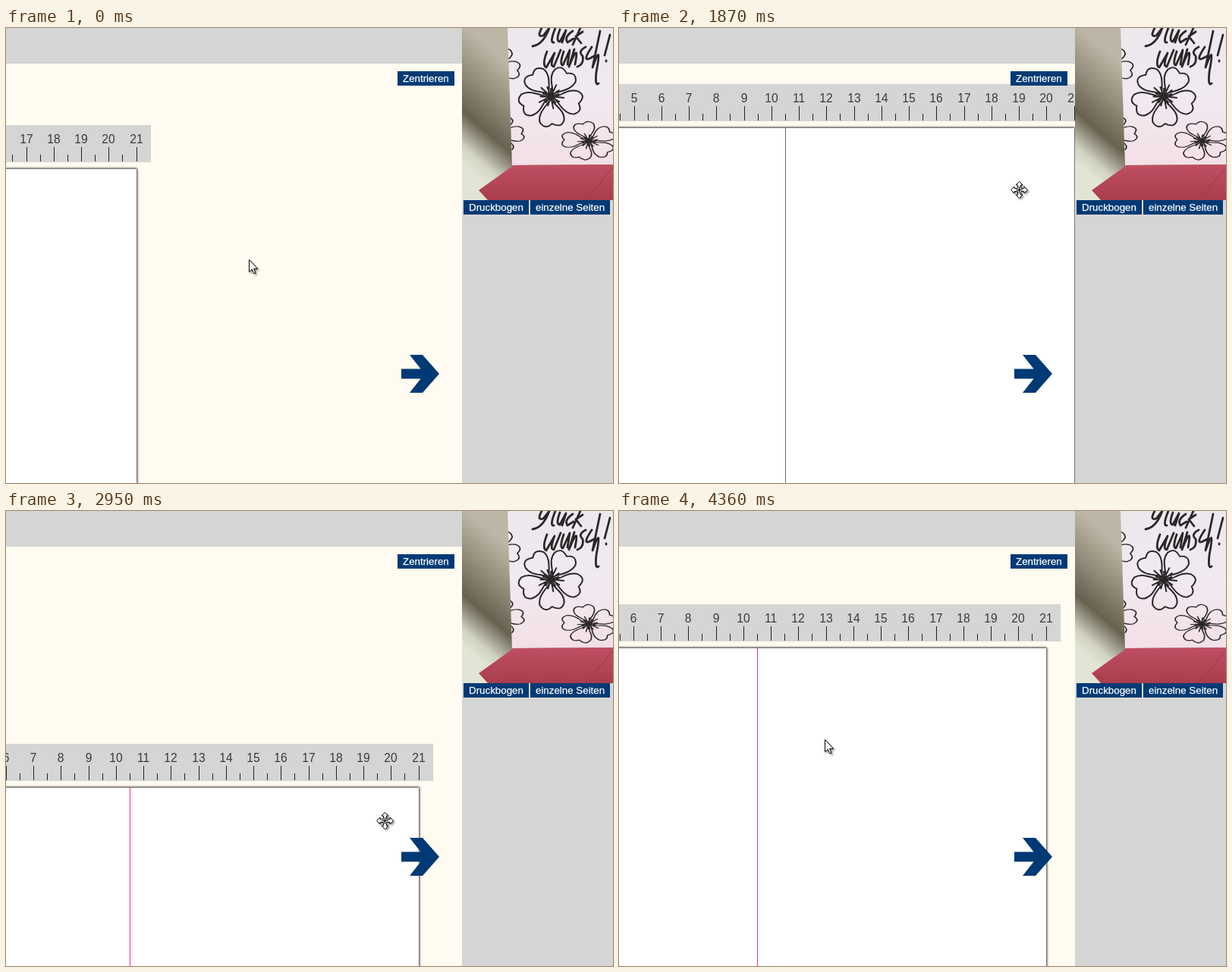
Animation, 800 px wide and 600 px high, one loop 4520 ms. Source, as an HTML page:

```html
<!DOCTYPE html>
<html lang="de">
<head>
<meta charset="utf-8">
<style>
html, body { margin: 0; width: 100%; height: 100%; overflow: hidden; }
svg { display: block; width: 800px; height: 600px; font-family: "Liberation Sans", Arial, sans-serif; }
.ink { fill: none; stroke: #2b2629; stroke-width: 2; stroke-linecap: round; stroke-linejoin: round; }
.letters { stroke-width: 2.8; }
.ruler text { font-size: 15.6px; fill: #3a3a3a; text-anchor: middle; }
.crisp { shape-rendering: crispEdges; }
.button rect { fill: #003a75; }
.button text { font-size: 13.333px; fill: #fff; stroke: #fff; stroke-width: .25; }
.cursor { fill: #fff; stroke: #000; filter: url(#cursorShadow); }
</style>
</head>
<body>
<svg viewBox="0 0 800 600">
  <defs>
    <clipPath id="workspace"><rect y="47" width="601" height="553"/></clipPath>
    <clipPath id="photo"><rect x="601" width="199" height="227"/></clipPath>
    <clipPath id="cardFront"><path d="M661 0H800V180L667 181Z"/></clipPath>
    <filter id="soft" filterUnits="userSpaceOnUse" x="-900" y="-20" width="930" height="940"><feGaussianBlur stdDeviation="1.5"/></filter>
    <filter id="cursorShadow" x="-50%" y="-50%" width="200%" height="200%"><feDropShadow dx="2" dy="2" stdDeviation="1" flood-opacity=".4"/></filter>
    <linearGradient id="inside" gradientUnits="userSpaceOnUse" x1="720" y1="52" x2="607" y2="183">
      <stop offset=".2" stop-color="#bdb6a6"/><stop offset=".45" stop-color="#958d7b"/>
      <stop offset=".7" stop-color="#686150"/><stop offset=".9" stop-color="#d2d3c1"/><stop offset="1" stop-color="#e2e5d5"/>
    </linearGradient>
    <linearGradient id="front" x2="0" y2="1"><stop stop-color="#ece8ec"/><stop offset=".5" stop-color="#f1eaf0"/><stop offset="1" stop-color="#f4dfe7"/></linearGradient>
    <linearGradient id="envelope" x2="0" y2="1"><stop stop-color="#c04f62"/><stop offset="1" stop-color="#a83d4d"/></linearGradient>
  </defs>

  <rect width="800" height="600" fill="#d5d5d5"/>
  <rect y="47" width="601" height="553" fill="#fffbf0"/>
  <g clip-path="url(#workspace)">
    <g id="sheet">
      <rect x="-762" width="763" height="900" fill="#000" filter="url(#soft)" opacity=".85"/>
      <rect x="-762" y="1" width="762" height="900" fill="#fff"/>
      <rect id="fold" class="crisp" x="-381" y="1" width="1" height="900"/>
      <g id="ruler" class="ruler"><rect class="crisp" x="-781" y="-57" width="800" height="49" fill="#d5d5d5"/></g>
    </g>
  </g>
  <path fill="#003a75" d="M521 449.5H546.5L532 431H549L571 456L549 481H532L546.5 462.5H521Z"/>

  <g clip-path="url(#photo)">
    <rect x="601" width="199" height="227" fill="url(#inside)"/>
    <path d="M661 0H800V180L667 181Z" fill="url(#front)"/>
    <path d="M623 214L669 181L800 180V227H635Z" fill="url(#envelope)"/>
    <path d="M764 227L800 184" stroke="#98394a" fill="none"/>
    <g class="ink" clip-path="url(#cardFront)">
      <g id="flowers"></g>
      <path class="letters" d="M706 0Q699 13 708 10L716 0Q708 22 694 24M724 0Q716 20 722 19M730 2Q724 18 730 18L738 3L733 19M747 4Q735 12 740 19L748 14M757 0L747 22M760 5L751 11L758 20"/>
      <path class="letters" d="M713 31Q706 49 712 52L723 33Q716 51 722 51L731 29M735 31Q729 49 734 49L743 29L740 48M749 28L742 51Q756 16 750 48M764 25Q753 31 760 37Q762 48 753 51M772 25Q756 49 775 37M783 4L773 52Q786 16 778 58Q776 78 781 73M796 9L789 36M791 43V44"/>
    </g>
  </g>
  <g id="buttons"></g>

  <path id="arrow" class="cursor" d="M.5 .5V16.7L4.2 13.2L6.8 19L9 18L6.6 12.4H11.6Z"/>
  <g id="move" class="cursor"></g>
</svg>
<script>
const LOOP = 4520, STEP = 30, CM = 36.25;
const PRESS = 910, RELEASE = 3580, LEAVE = 3740, GLIDE = 4060;
const LAG = 80, GRIP = [76, -81];
const $ = id => document.getElementById(id);

function add(parent, tag, attrs, text) {
  const node = document.createElementNS("http://www.w3.org/2000/svg", tag);
  for (const key in attrs) node.setAttribute(key, attrs[key]);
  if (text !== undefined) node.textContent = text;
  return parent.appendChild(node);
}

// Ruler: origin is the right edge of the sheet, at 21 cm
for (let half = 0; half <= 42; half++) {
  const x = Math.floor((half / 2 - 21) * CM), whole = half % 2 === 0;
  add($("ruler"), "rect", { class: "crisp", x, y: whole ? -28 : -18, width: 1, height: whole ? 19 : 9, fill: "#222" });
  if (whole) add($("ruler"), "text", { x, y: -33 }, half / 2);
}

function button(x, y, width, label) {
  const group = add($("buttons"), "g", { class: "button" });
  add(group, "rect", { x, y, width, height: 19 });
  add(group, "text", { x: x + 7, y: y + 14 }, label);
}
button(516, 57, 75, "Zentrieren");
button(603, 227, 86, "Druckbogen");
button(691, 227, 105, "einzelne Seiten");

function flower(x, y, sx, sy, turn) {
  const group = add($("flowers"), "g", { transform: `translate(${x} ${y}) scale(${sx} ${sy})` });
  for (let i = 0; i < 5; i++) {
    add(group, "path", {
      transform: `rotate(${turn + i * 72})`,
      d: "M4 0C14 -6 20 -18 33 -17Q45 -14 38 -1Q47 8 36 15C24 18 14 7 4 0M0 0L17 -3M0 0L13 4M0 0L9 -6"
    });
  }
}
flower(718, 90, 1, .95, -55);
flower(768, 149, .85, .6, -30);
flower(645, 140, .9, .6, 0);
flower(640, 52, .9, .7, 10);

for (let side = 0; side < 4; side++) {
  add($("move"), "path", { transform: `rotate(${side * 90})`, d: "M-2 -2V-6.5H-4.5L0 -11L4.5 -6.5H2V-2M0 0V-4.5" });
}

// The hand: rows of [time, x, y]
const hand = [
  [130, 320, 305], [580, 96, 266], [PRESS, 96, 266],
  [1340, 285, 230], [1610, 469, 199], [1790, 524, 212], [1870, 527, 213],
  [2200, 498, 133], [2410, 458, 231], [2630, 431, 385], [2710, 431, 442], [2800, 447, 458],
  [3110, 537, 333], [3190, 531, 318], [3500, 487, 261], [RELEASE, 474, 283],
  [LEAVE, 452, 280], [3900, 433, 283], [4360, 271, 301]
];

// Cubic interpolation that never overshoots its points
function along(path, time) {
  const last = path.length - 1;
  const t = Math.min(Math.max(time, path[0][0]), path[last][0]);
  let i = 0;
  while (i < last - 1 && t > path[i + 1][0]) i++;
  const span = path[i + 1][0] - path[i][0], u = (t - path[i][0]) / span, v = 1 - u;
  return [1, 2].map(axis => {
    const slope = k => (path[k + 1][axis] - path[k][axis]) / (path[k + 1][0] - path[k][0]);
    const tangent = k => {
      if (k === 0 || k === last) return 0;
      const a = slope(k - 1), b = slope(k);
      return a * b > 0 ? 2 * a * b / (a + b) : 0;
    };
    return Math.round(path[i][axis] * v * v * (1 + 2 * u) + path[i + 1][axis] * u * u * (3 - 2 * u)
      + span * u * v * (tangent(i) * v - tangent(i + 1) * u));
  });
}

function recorded(t) {
  const snap = (start, step) => start + Math.floor((t - start) / step) * step;
  if (t < LEAVE) return Math.min(snap(160, STEP), RELEASE);
  return t < GLIDE ? snap(LEAVE, 160) : snap(GLIDE, STEP);
}

function place(node, [x, y]) {
  node.setAttribute("transform", `translate(${x} ${y})`);
}

function draw(now) {
  const t = recorded(now % LOOP);
  const tip = along(hand, t);
  // The sheet trails the hand and stays where it was at the release
  const dragTime = Math.max(PRESS, Math.min(t, RELEASE) - LAG);
  const sheet = along(hand, dragTime).map((value, axis) => value + GRIP[axis]);
  const moving = t < LEAVE && tip[0] < sheet[0];
  place($("sheet"), sheet);
  $("fold").setAttribute("fill", t < 1990 ? "#776d6d" : "#f5269f");
  place($("arrow"), tip);
  place($("move"), [tip[0] + .5, tip[1] + .5]);
  $("arrow").style.display = moving ? "none" : "";
  $("move").style.display = moving ? "" : "none";
}

let begin;
function tick(now) {
  begin ??= now;
  draw(Math.max(0, now - begin));
  requestAnimationFrame(tick);
}
draw(0);
requestAnimationFrame(tick);
</script>
</body>
</html>
```
